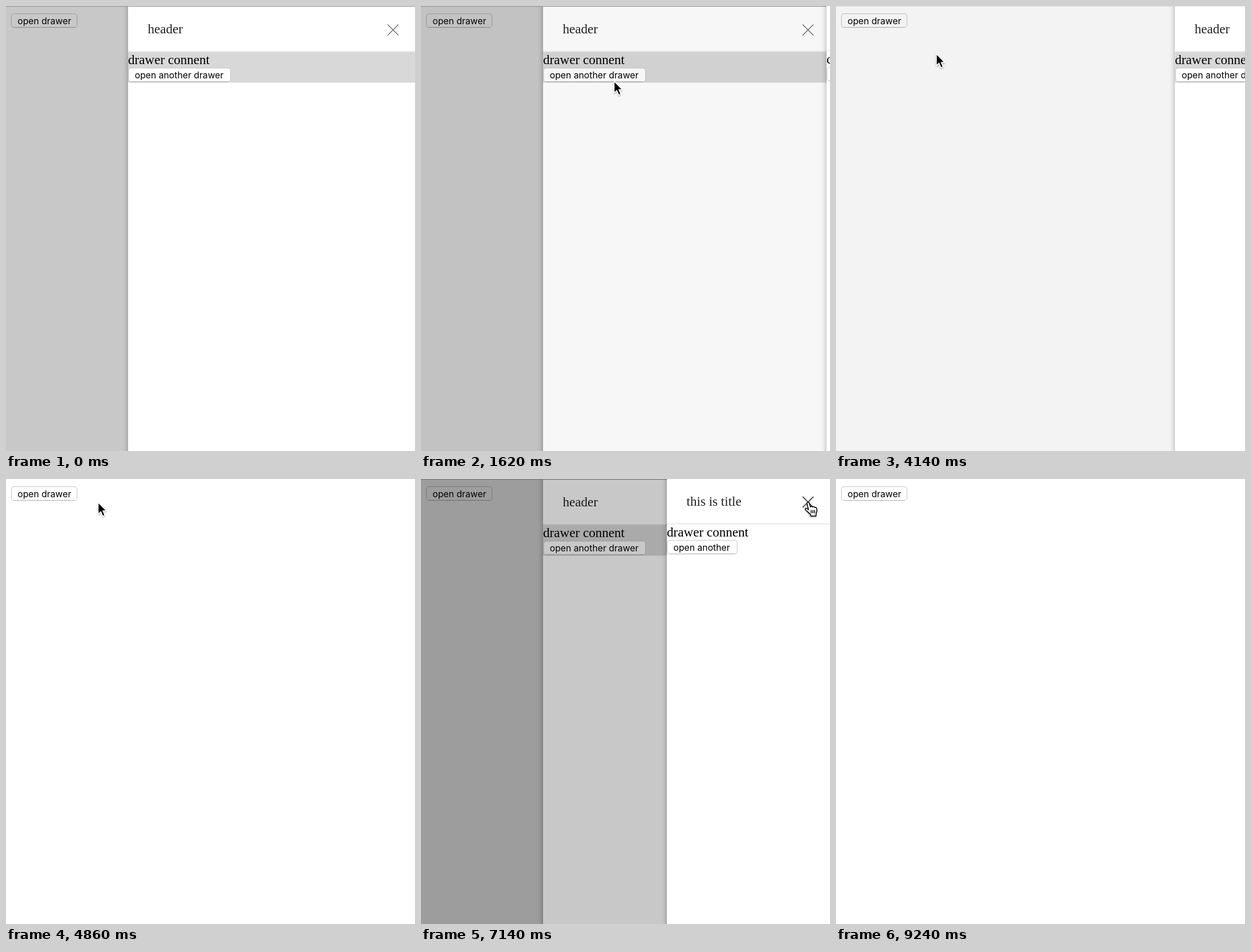
Recreate the animation shown at these times as an HTML page. Size 717 by 781 pixels, loop 9.66 s.

```html
<!DOCTYPE html>
<html lang="en">
<head>
<meta charset="utf-8">
<title>Nested drawers</title>
<style>
  html, body { margin: 0; width: 100%; height: 100%; overflow: hidden; background: #fff; }
  svg { display: block; width: 717px; height: 781px; }
  .serif { font: 23.1px "Liberation Serif", "Times New Roman", serif; }
  .title { fill: #222; }
  .label { font: 15.75px Inter, sans-serif; }
  .button { fill: #fff; stroke: #c4c4c4; }
  .edge { stroke: #a9a9a9; }
  .cross { stroke: #666; stroke-width: 1.3; }
  .cross.hover { stroke: #111; }
</style>
</head>
<body>
<svg viewBox="0 0 717 781">
  <defs>
    <linearGradient id="shade">
      <stop offset="0" stop-opacity="0"/>
      <stop offset=".5" stop-opacity=".045"/>
      <stop offset="1" stop-opacity=".16"/>
    </linearGradient>
    <filter id="soft" x="-50%" y="-50%" width="200%" height="200%">
      <feDropShadow dx="0" dy="1.5" stdDeviation="1.2" flood-opacity=".35"/>
    </filter>
  </defs>

  <g id="page"></g>
  <rect id="mask1" width="717" height="781"/>
  <g id="drawer1">
    <rect x="-10" width="10" height="781" fill="url(#shade)"/>
    <rect width="503" height="781" fill="#fff"/>
    <rect y="79" width="503" height="2" fill="#e8e8e8"/>
    <rect y="81" width="503" height="53.5" fill="#d8d8d8"/>
    <text class="serif title" x="34.5" y="48">header</text>
    <text class="serif" x="0" y="102">drawer connent</text>
    <path class="cross" d="M455 32.5l19 19m0-19l-19 19"/>
  </g>
  <rect id="topLine" width="717" height="1.2" fill="#969696"/>
  <rect id="mask2" width="717" height="781"/>
  <g id="drawer2">
    <rect x="-10" width="10" height="781" fill="url(#shade)"/>
    <rect width="286" height="781" fill="#fff"/>
    <rect y="78" width="286" height="1.4" fill="#e2e2e2"/>
    <text class="serif title" x="34.5" y="46.5">this is title</text>
    <text class="serif" x="0" y="100.5">drawer connent</text>
    <path class="cross" d="M238 31l19 19m0-19l-19 19"/>
  </g>

  <g id="cursor" filter="url(#soft)" stroke="#fff" stroke-linejoin="round">
    <path id="arrow" stroke-width="1.5" d="M0 0V20.5L4.7 16.2L8.2 24.2L11.8 22.6L8.4 14.8H14.5Z"/>
    <path id="hand" fill="#fff" stroke="#000" stroke-width="1.5" d="M-1.5 1.5C-1.5-.8 2-1 2.6 1.3L4.8 8.2C5.2 6.6 8 6.6 8.5 8.4C9.4 7 12 7.3 12.4 9.2C13.5 8.3 15.5 9 15.7 11C16.3 15 16 17.5 14.5 20V24H5.2V21.5C2.5 19.5.2 16.5-3.5 13.5C-6 11.2-3.5 9.2-1.2 11L1.4 13ZM6 13.5V19M9 13.5V19M12 13.5V19"/>
  </g>
</svg>
<script>
const LOOP = 9660, STEP = 60, SLIDE = 450, SHADE = 0.216;
const $ = id => document.getElementById(id);
const ids = ['page', 'mask1', 'drawer1', 'topLine', 'mask2', 'drawer2', 'cursor', 'arrow', 'hand'];
const ui = Object.fromEntries(ids.map(id => [id, $(id)]));

function addButton(parent, x, y, w, label) {
  const g = document.createElementNS('http://www.w3.org/2000/svg', 'g');
  g.innerHTML =
    `<rect class="button" x="${x}" y="${y}" width="${w}" height="24" rx="4.5"/>
     <path class="edge" d="M${x + 4} ${y + 24}h${w - 8}"/>
     <text class="label" x="${x + 10.7}" y="${y + 18.2}">${label}</text>`;
  parent.append(g);
  return g.firstChild;
}
addButton(ui.page, 9.5, 13.5, 115, 'open drawer');
const opener = addButton(ui.drawer1, 1, 109, 178.5, 'open another drawer');
addButton(ui.drawer2, 0.8, 107.5, 122.5, 'open another');

// [start time, 1 = open / 0 = close]
const moves1 = [[-LOOP, 1], [3940, 0], [5090, 1], [8660, 0]];
const moves2 = [[-LOOP, 0], [1616, 1], [2900, 0], [6260, 1], [7400, 0]];

// Pointer path: time, x, y
const path = [
  [480, 420, 781], [1440, 338.5, 132], [3420, 338.5, 132], [3900, 150, 110],
  [4300, 190, 70], [4860, 161.5, 41], [5040, 92, 28], [5340, 92, 28],
  [6120, 282, 116], [6480, 282, 116], [7100, 678, 41]
];

const clamp = v => Math.min(1, Math.max(0, v));
const easeOut = p => 1 - (1 - clamp(p)) ** 2.4;

function openness(moves, t, lead = false) {
  let value = 0;
  for (const [start, open] of moves) {
    const begin = start - (lead ? (open ? 26 : 14) : 0);
    if (t < begin) break;
    const p = easeOut((t - begin) / SLIDE);
    value = open ? p : 1 - p;
  }
  return value;
}

function pointerAt(t) {
  const i = path.findIndex(k => k[0] > t);
  if (i < 0) return path[path.length - 1].slice(1);
  const [t0, x0, y0] = path[Math.max(0, i - 1)], [t1, x1, y1] = path[i];
  const p = clamp((t - t0) / (t1 - t0 || 1)), s = p * p * (3 - 2 * p);
  return [x0 + (x1 - x0) * s, y0 + (y1 - y0) * s];
}

const show = (el, on) => el.setAttribute('visibility', on ? 'inherit' : 'hidden');

function place(drawer, mask, moves, t, width, y) {
  const shade = openness(moves, t, true);
  const x = 717 - width * openness(moves, t);
  mask.setAttribute('opacity', shade * SHADE);
  drawer.setAttribute('transform', `translate(${x} ${y})`);
  show(drawer, shade > 0);
  return shade;
}

function draw(t) {
  const shade1 = place(ui.drawer1, ui.mask1, moves1, t, 503, 0);
  place(ui.drawer2, ui.mask2, moves2, t, 286, 0);
  ui.topLine.setAttribute('opacity', shade1);

  const focused = t >= 2640 && t < 3940;
  opener.style.stroke = focused ? '#4f8ff0' : '';
  opener.style.strokeWidth = focused ? 2.8 : '';

  const [x, y] = pointerAt(t);
  const overCross = t >= 7020 && t < 8760;
  ui.cursor.setAttribute('transform', `translate(${x} ${y})`);
  show(ui.cursor, t >= 480 && t < 9240);
  show(ui.arrow, !overCross);
  show(ui.hand, overCross);
  ui.drawer2.querySelector('.cross').classList.toggle('hover', overCross && t < 7440);
  ui.drawer1.querySelector('.cross').classList.toggle('hover', overCross && t >= 7500);
}

const origin = performance.now();
function tick() {
  const t = (performance.now() - origin) % LOOP;
  draw(Math.floor(t / STEP) * STEP);
  requestAnimationFrame(tick);
}
tick();
</script>
</body>
</html>
```
